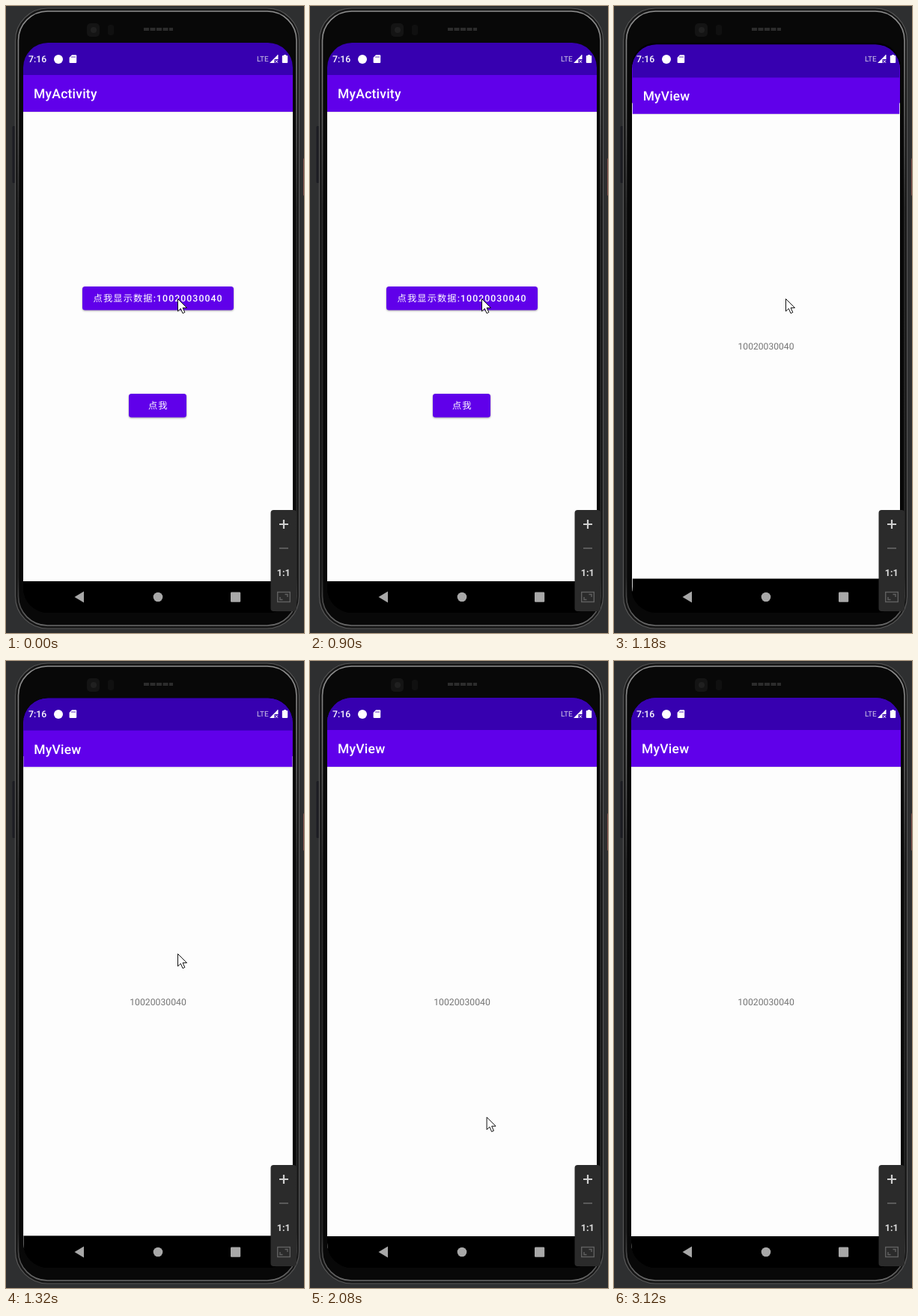
Write an HTML page that moves like this. It is 398 by 836 pixels and loops after 3170 ms.

```html
<!DOCTYPE html>
<html lang="zh">
<head>
<meta charset="utf-8">
<title>MyActivity</title>
<style>
html, body { margin: 0; width: 100%; height: 100%; overflow: hidden; background: #2e2f30; }
svg { display: block; width: 398px; height: 836px; }
text { font-family: Roboto, "Noto Sans CJK SC", "Noto Sans CJK", sans-serif; text-rendering: geometricPrecision; white-space: pre; }
.title { font-size: 17.5px; font-weight: 500; letter-spacing: .22px; fill: #fff; }
.label { font-size: 12.25px; font-weight: 500; letter-spacing: 1.094px; fill: #fff; }
.label .han { font-weight: 400; }
.button { fill: #6000ea; filter: drop-shadow(0 1px 1px rgba(0, 0, 0, .35)); }
</style>
</head>
<body>
<svg viewBox="0 0 398 836">
  <defs>
    <clipPath id="screen"><rect id="screenShape" x="23" y="49" width="360" height="760" rx="33"/></clipPath>
    <linearGradient id="shine" x1="0" y1="0" x2="0" y2="1">
      <stop offset="0" stop-color="#909090"/>
      <stop offset=".12" stop-color="#707070"/>
      <stop offset=".32" stop-color="#2c2c2c"/>
      <stop offset=".92" stop-color="#262626"/>
      <stop offset="1" stop-color="#6a6a6a"/>
    </linearGradient>
    <g id="chrome">
      <rect x="23" y="49" width="360" height="44" fill="#3700b0"/>
      <rect x="23" y="92" width="360" height="49" fill="#6000ea"/>
      <rect x="23" y="141" width="360" height="626" fill="#fdfdfd"/>
      <rect x="23" y="141" width="360" height="1" fill="#e6e6e6"/>
      <rect x="23" y="767" width="360" height="42"/>
    </g>
  </defs>

  <rect width="398" height="836" fill="#2e2f30"/>
  <g id="phone">
    <rect x="8.5" y="160" width="4" height="76" rx="1.5" fill="#1c1d22"/>
    <rect x="12.5" y="3" width="379" height="827" rx="43" fill="#161616" stroke="#565656" stroke-width="1.2"/>
    <rect x="16.5" y="7" width="371.5" height="819" rx="39" fill="#080808" stroke="url(#shine)" stroke-width="1.6"/>
    <rect x="397" y="203" width="3" height="50" rx="1.5" fill="#80504a"/>
    <rect x="108" y="23" width="17" height="18" rx="5" fill="#141414"/>
    <circle cx="117" cy="32" r="4" fill="#202020"/>
    <rect x="136" y="25" width="8" height="14" rx="3" fill="#101010"/>
    <path d="M184 31H223" stroke="#2c2c2c" stroke-width="4" stroke-dasharray="7 1.5"/>
    <rect x="23" y="49" width="360" height="760" rx="33"/>
  </g>

  <g clip-path="url(#screen)">
    <g id="firstPage">
      <use href="#chrome"/>
      <text class="title" x="37" y="123">MyActivity</text>
      <rect class="button" x="102" y="374" width="202" height="31.5" rx="3.5"/>
      <text class="label" x="116.6" y="394.4"><tspan class="han">点我显示数据</tspan>:10020030040</text>
      <rect class="button" x="164" y="517" width="77" height="31.5" rx="3.5"/>
      <text class="label" x="190" y="537.4"><tspan class="han">点我</tspan></text>
    </g>
    <g id="secondPage">
      <use href="#chrome"/>
      <text class="title" x="37" y="123">MyView</text>
      <text x="203" y="458.7" text-anchor="middle" font-size="12.25" fill="#757575">10020030040</text>
    </g>
  </g>

  <g id="system" fill="#fff">
    <text x="30" y="75.2" font-size="12.25" font-weight="500">7:16</text>
    <circle cx="70" cy="71" r="6"/>
    <path d="M88 65.3h5.2q1 0 1 1v8.7q0 1-1 1h-7.6q-1 0-1-1v-6.3z"/>
    <path d="M88 67v2M90 67v2M92 67v2" stroke="#3700b0" stroke-width=".8"/>
    <text x="335" y="74.3" font-size="10" fill="#d4cbe8">LTE</text>
    <path d="M352 76L363 65V71H358.5V76Z"/>
    <path d="M363 65V71M359.8 72.2l3.2 3.6m0-3.6l-3.2 3.6" fill="none" stroke="#fff"/>
    <path d="M371 65h3v1h1.2q1 0 1 1v8q0 1-1 1h-5.4q-1 0-1-1v-8q0-1 1-1h1.2z"/>
    <g fill="#a8a8a8">
      <path d="M91.5 788L104 780.5V795.5Z"/>
      <circle cx="203" cy="788" r="6.3"/>
      <rect x="300" y="781.5" width="13.2" height="13.2" rx="1.2"/>
    </g>
  </g>

  <g id="toolbar">
    <rect x="353.5" y="672" width="34.5" height="135" rx="4" fill="#2b2b2b"/>
    <path d="M365 691H377M371 685V697" stroke="#cfcfcf" stroke-width="2.2"/>
    <path d="M365 723H377" stroke="#606060" stroke-width="1.8"/>
    <text x="370.7" y="760.3" text-anchor="middle" font-size="12.5" font-weight="700" fill="#dcdcdc">1:1</text>
    <g fill="none" stroke="#606060" stroke-width="1.4">
      <rect x="362.7" y="781.5" width="16.6" height="13"/>
      <path d="M366 788V791.5H369.5M372.5 784.5H376V788"/>
    </g>
  </g>

  <path id="cursor" d="M0 0V16.5L3.8 12.9L6.5 19.2L9.3 18L6.6 11.9H12Z" fill="#fff" stroke="#111" stroke-width="1" stroke-linejoin="round"/>
</svg>
<script>
const LOOP = 3170, OPEN_AT = 1049, OPEN_TIME = 500;
const [firstPage, secondPage, screenShape, cursor] =
  ["firstPage", "secondPage", "screenShape", "cursor"].map(id => document.getElementById(id));

const clamp = v => Math.min(1, Math.max(0, v));
const mix = (a, b, p) => a + (b - a) * p;
const cubic = (a, b, c, d, s) =>
  a * (1 - s) ** 3 + 3 * b * s * (1 - s) ** 2 + 3 * c * s * s * (1 - s) + d * s ** 3;

// Fast start with a very long, slow finish: two joined cubic curves.
const CURVES = [
  { x: [0, .05, .1333, .1667], y: [0, 0, .06, .4] },
  { x: [.1667, .2083, .25, 1], y: [.4, .82, 1, 1] }
];
function pageEase(t) {
  const { x, y } = CURVES[t < .1667 ? 0 : 1];
  let low = 0, high = 1;
  for (let i = 0; i < 24; i++) {
    const mid = (low + high) / 2;
    if (cubic(...x, mid) < t) low = mid; else high = mid;
  }
  return cubic(...y, low);
}

// Pointer stops: time, x, y
const STOPS = [[1580, 229.5, 390.5], [1650, 230.5, 396.5], [2500, 241.5, 812.5], [2580, 243, 842]];
function pointerAt(t) {
  if (t <= STOPS[0][0]) return STOPS[0].slice(1);
  const i = STOPS.findIndex(stop => stop[0] >= t);
  if (i < 0) return STOPS[STOPS.length - 1].slice(1);
  const [t0, x0, y0] = STOPS[i - 1], [t1, x1, y1] = STOPS[i];
  const u = (t - t0) / (t1 - t0);
  const p = i === 2 ? mix(u, u * u * (3 - 2 * u), .6) : u;
  return [mix(x0, x1, p), mix(y0, y1, p)];
}

function zoom(node, scale) {
  node.setAttribute("transform", `translate(203 429) scale(${scale}) translate(-203 -429)`);
}

function draw(t) {
  const p = pageEase(clamp((t - OPEN_AT) / OPEN_TIME));
  const fade = clamp((t - OPEN_AT - 50) / 80);
  const enterScale = mix(.95, 1, p);
  zoom(firstPage, mix(1, 1.05, p));
  zoom(secondPage, enterScale);
  // The visible area shrinks a little with the incoming page.
  zoom(screenShape, mix(1, enterScale, fade * .55));
  secondPage.setAttribute("opacity", fade);
  cursor.setAttribute("transform", `translate(${pointerAt(t)})`);
}

const start = performance.now();
function tick() {
  draw((performance.now() - start) % LOOP);
  requestAnimationFrame(tick);
}
tick();
</script>
</body>
</html>
```
